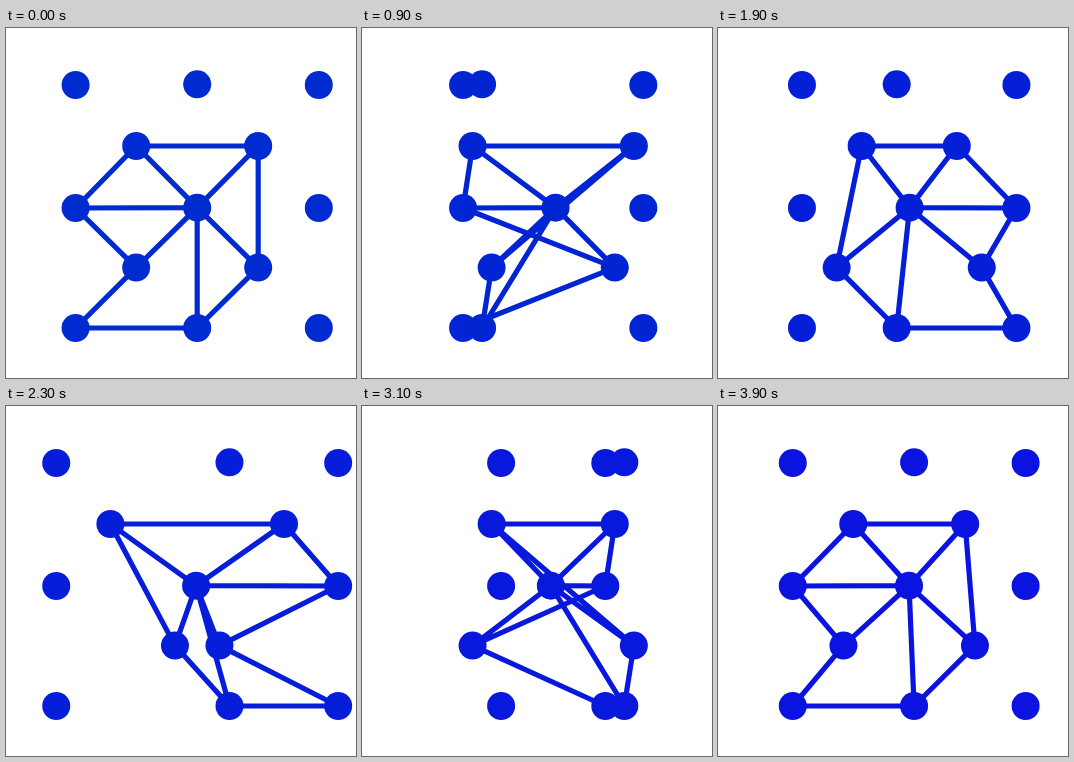
These frames come from a looping animation (350x350 px, 4000 ms). An HTML page with a canvas:

```html
<!DOCTYPE html>
<html lang="en">
<head>
<meta charset="utf-8">
<title>Rotating lattice</title>
<style>
  html, body { margin: 0; width: 100%; height: 100%; overflow: hidden; background: #fff; }
  canvas { display: block; }
</style>
</head>
<body>
<canvas id="stage" width="350" height="350"></canvas>
<script>
const ctx = document.getElementById('stage').getContext('2d');

const LOOP = 4000, STEP = 100;
const CENTER_X = 191.2, DOT_RADIUS = 14, LINE_WIDTH = 5.2;
const WIDE = 121.6, NARROW = 61, DEPTH = 72;

// Each node: x offset from the axis, height on the stage, depth.
const nodes = {
  topLeft:     [-WIDE, 57, -DEPTH],
  topMid:      [0, 56.3, -DEPTH],
  topRight:    [WIDE, 57, DEPTH],
  upperLeft:   [-NARROW, 118, -DEPTH],
  upperRight:  [NARROW, 118, DEPTH],
  left:        [-WIDE, 180, -DEPTH],
  hub:         [0, 179.7, 2.4],
  right:       [WIDE, 180, DEPTH],
  lowerLeft:   [-NARROW, 239.6, DEPTH],
  lowerRight:  [NARROW, 239.6, -DEPTH],
  bottomLeft:  [-WIDE, 300, -DEPTH],
  bottomMid:   [0, 300, -DEPTH],
  bottomRight: [WIDE, 300, DEPTH]
};

// Continuous strokes through the nodes.
const paths = [
  ['hub', 'upperLeft', 'upperRight', 'hub', 'left', 'upperLeft'],
  ['upperRight', 'lowerRight', 'hub', 'bottomMid', 'lowerRight'],
  ['left', 'lowerLeft', 'hub'],
  ['lowerLeft', 'bottomLeft', 'bottomMid']
];

// Time in ms and turn in degrees.
const turnKeys = [
  [0, 0], [500, 45.3], [1300, 116.7], [1900, 170],
  [2700, 243.3], [3100, 279], [3900, 356.1], [LOOP, 360]
];

function turnAt(time) {
  const i = turnKeys.findIndex(([t]) => t > time);
  const [t0, a0] = turnKeys[i - 1];
  const [t1, a1] = turnKeys[i];
  return (a0 + (a1 - a0) * (time - t0) / (t1 - t0)) * Math.PI / 180;
}

function draw(time) {
  const turn = turnAt(time), p = time / LOOP;
  const cos = Math.cos(turn), sin = Math.sin(turn);
  const project = name => {
    const [x, y, z] = nodes[name];
    return [CENTER_X + x * cos + z * sin, y];
  };

  ctx.fillStyle = '#fff';
  ctx.fillRect(0, 0, 350, 350);
  ctx.fillStyle = ctx.strokeStyle =
    `rgb(${10 * p}, ${43 - 25 * p}, ${208 + 16 * p})`;
  ctx.lineWidth = LINE_WIDTH;
  ctx.lineJoin = 'round';

  for (const path of paths) {
    ctx.beginPath();
    path.forEach(name => ctx.lineTo(...project(name)));
    ctx.stroke();
  }
  for (const name in nodes) {
    ctx.beginPath();
    ctx.arc(...project(name), DOT_RADIUS, 0, 2 * Math.PI);
    ctx.fill();
  }
}

let start;
function tick(now) {
  start ??= now;
  draw(Math.floor((now - start) % LOOP / STEP) * STEP);
  requestAnimationFrame(tick);
}
draw(0);
requestAnimationFrame(tick);
</script>
</body>
</html>
```
